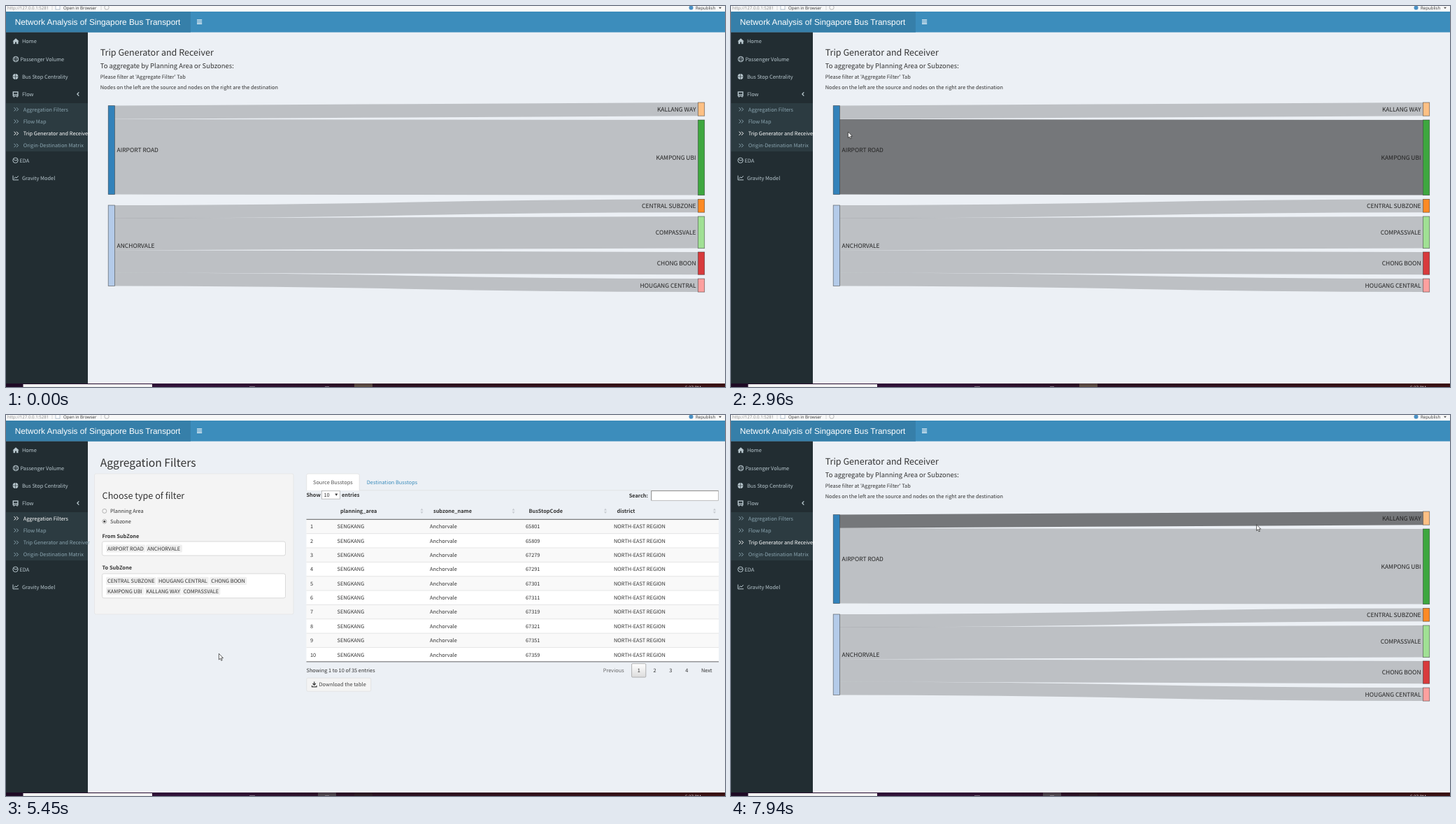
An HTML page that plays this animation: 1028x545 px, repeating every 8 s.

```html
<!DOCTYPE html>
<html lang="en">
<head>
<meta charset="utf-8">
<title>Bus transport dashboard</title>
<style>
  html, body { margin: 0; width: 100%; height: 100%; overflow: hidden; background: #ecf0f5; }
  svg { display: block; width: 100%; height: 100%; }
  text {
    font-family: "Noto Sans CJK JP", "Noto Sans CJK SC", "Noto Sans CJK KR", "Noto Sans CJK TC", "Noto Sans CJK", Lato, sans-serif;
    font-size: 7.38px; fill: #333; text-rendering: geometricPrecision; white-space: pre;
  }
  .b { font-weight: 700; }
  .end { text-anchor: end; }
  .mid { text-anchor: middle; }
  .head { font: 11.8px "Liberation Sans", Arial, sans-serif; fill: #fff; }
  .ui { font: 6.1px "Open Sans", "Noto Sans", sans-serif; }
  .node { font-size: 8.46px; fill: #222; }
  .menu text { fill: #b8c7ce; }
  .menu .sub text { fill: #8aa4af; }
  .menu .hot text { fill: #fff; }
  .icon { fill: none; stroke: #b8c7ce; stroke-width: 1; }
  .sub .icon { stroke: #8aa4af; }
  .hot .icon { stroke: #fff; }
  .link { fill: none; stroke: #000; stroke-opacity: .2; }
  .link.hot { stroke-opacity: .5; }
  .box { fill: #fff; stroke: #ccc; stroke-width: .7; }
</style>
</head>
<body>
<svg id="stage" viewBox="0 0 1028 545" preserveAspectRatio="none" xmlns="http://www.w3.org/2000/svg"></svg>
<script>
const rect = (x, y, w, h, fill, more = '') =>
  `<rect x="${x}" y="${y}" width="${w}" height="${h}" ${fill ? `fill="${fill}"` : ''} ${more}/>`;
const text = (x, y, s, cls = '', more = '') => `<text x="${x}" y="${y}" class="${cls}" ${more}>${s}</text>`;
const path = (d, more = 'class="icon"') => `<path d="${d}" ${more}/>`;
const circle = (x, y, r, more = 'class="icon"') => `<circle cx="${x}" cy="${y}" r="${r}" ${more}/>`;
const line = (x1, x2, y, color, w = .7) => path(`M${x1} ${y}H${x2}`, `stroke="${color}" stroke-width="${w}"`);
const size = px => `style="font-size:${px}px"`;
const fill = color => `style="fill:${color}"`;

function browserBar() {
  return rect(0, 0, 1028, 8, '#f8f8f8')
    + text(2, 4.8, 'http://127.0.0.1:5281', 'ui', fill('#888'))
    + text(82, 4.8, 'Open in Browser', 'ui')
    + text(986, 4.8, 'Republish', 'ui')
    + rect(71, -1, 6, 6, '#fff', 'stroke="#9ab" stroke-width=".7"')
    + circle(144, 2, 3.2, 'fill="none" stroke="#bbb" stroke-width="1"')
    + circle(979.5, 2.5, 3, 'fill="#4a90c4"')
    + path('M1019 1.8h4l-2 2.2z', 'fill="#444"')
    + path('M66 0V6M136 0V6', 'stroke="#ccc" stroke-width=".7"');
}

function header() {
  return rect(0, 8, 1028, 29.6, '#3c8dbc') + rect(0, 8, 264, 29.6, '#367fa9')
    + text(12.7, 27, 'Network Analysis of Singapore Bus Transport', 'head')
    + path('M273 20.2h7.2M273 22.8h7.2M273 25.4h7.2', 'stroke="#fff" stroke-width="1.3"');
}

function sidebar() {
  const subs = ['Aggregation Filters', 'Flow Map', 'Trip Generator and Receiver', 'Origin-Destination Matrix'];
  const solid = 'fill="#b8c7ce"';
  return rect(0, 37.6, 117, 502.4, '#222d32') + rect(0, 139, 117, 69, '#2c3b41') + '<g class="menu">'
    + path('M9.5 50.5L14 46.3l4.7 4.2h-1.2v3.7h-2.6v-2.6h-1.8v2.6h-2.6v-3.7z', solid)
    + text(23, 53, 'Home')
    + circle(14, 76, 3.8) + path('M10.5 74.5h7M10.5 77.5h7M12.5 72.7v6.6M15.5 72.7v6.6', 'class="icon" style="stroke-width:.5"')
    + text(20.5, 78.8, 'Passenger Volume')
    + circle(13.5, 101, 3.9, solid) + path('M9.6 101h7.8M13.5 97v8', 'stroke="#222d32" stroke-width=".6"')
    + text(23, 104, 'Bus Stop Centrality')
    + `<g id="flow">${rect(0, 113.4, 117, 25.6, '#1e282c', 'id="flowBg"')}${rect(0, 113.4, 1.7, 25.6, '#3c8dbc', 'id="flowEdge"')}`
    + rect(10.3, 123, 6.6, 5.6, 'none', 'class="icon" style="stroke-width:1.4"') + path('M10 126.5h7M11.3 129v1.8M16 129v1.8')
    + text(23, 129.4, 'Flow')
    + path('M104.3 123.4l-2.4 2.6 2.4 2.6', 'class="icon" style="stroke-width:1.3"') + '</g>'
    + subs.map((name, i) => {
        const y = 147.8 + i * 17.25;
        return `<g class="sub">${path(`M11.5 ${y - 2.6}l2.6 2.6-2.6 2.6M15 ${y - 2.6}l2.6 2.6-2.6 2.6`)}${text(24.7, y + 2.9, name)}</g>`;
      }).join('')
    + circle(13.5, 220.8, 3.7) + path('M11 219.5l2.5 1.5 3-1')
    + text(19.5, 223.8, 'EDA')
    + path('M10 242.5v6.3h8M11.5 247l2-2.2 1.6 1.2 2.6-3')
    + text(23, 249, 'Gravity Model') + '</g>';
}

function sankeyPage() {
  // left centre, right centre, thickness, right colour, name
  const flows = [
    [152.1, 147.6, 19.2, '#ffbb78', 'KALLANG WAY'],
    [215.8, 216.8, 107.6, '#2ca02c', 'KAMPONG UBI'],
    [294.4, 285.8, 18.8, '#ff7f0e', 'CENTRAL SUBZONE'],
    [326.4, 323.8, 45.6, '#98df8a', 'COMPASSVALE'],
    [365.3, 368.1, 32.3, '#d62728', 'CHONG BOON'],
    [391, 399.6, 19, '#ff9896', 'HOUGANG CENTRAL']
  ];
  const node = (x, top, h, color) =>
    rect(x, top, 9.2, h, color, 'opacity=".9" stroke="rgba(0,0,0,.55)" stroke-width=".8"');
  const links = flows.map(([a, b, w]) =>
    path(`M155.4 ${a}C572.5 ${a} 572.5 ${b} 989.5 ${b}`, `class="link" stroke-width="${w}"`));
  const ends = flows.map(([, y, h, color, name]) =>
    node(989.5, y - h / 2, h, color) + text(986.5, y + 3.1, name, 'node end'));
  return text(134.7, 71.3, 'Trip Generator and Receiver', '', size(12.55))
    + text(134.7, 89, 'To aggregate by Planning Area or Subzones:', '', size(9.45))
    + text(134.7, 104.2, 'Please filter at \'Aggregate Filter\' Tab')
    + text(134.7, 118.7, 'Nodes on the left are the source and nodes on the right are the destination')
    + links.join('') + ends.join('')
    + node(146.2, 142.6, 126.9, '#1f77b4') + text(158.6, 209.2, 'AIRPORT ROAD', 'node')
    + node(146.2, 285, 115.4, '#aec7e8') + text(158.6, 346, 'ANCHORVALE', 'node');
}

function filterPanel() {
  const tag = (x, y, w, name) => rect(x - 2, y - 5.6, w + 4, 11.2, '#efefef', 'rx="1.5"') + text(x, y + 2.8, name);
  const radio = y => circle(140.8, y, 3, 'fill="#f4f4f4" stroke="#999" stroke-width=".7"');
  return rect(126.5, 84, 284.5, 201, '#f4f4f4', 'rx="2" stroke="#e3e3e3" stroke-width=".7"')
    + text(137.6, 119.6, 'Choose type of filter', '', size(12.6))
    + radio(137.4) + text(149, 140.2, 'Planning Area')
    + radio(152.2) + circle(140.8, 152.2, 1.5, 'fill="#444"') + text(149, 155, 'Subzone')
    + text(137.6, 175.7, 'From SubZone', 'b')
    + rect(137.5, 181, 262, 20, '', 'class="box" rx="2.4"')
    + tag(145, 191, 52.2, 'AIRPORT ROAD') + tag(202, 191, 48, 'ANCHORVALE')
    + text(137.6, 221, 'To SubZone', 'b')
    + rect(137.5, 227, 262, 34.8, '', 'class="box" rx="2.4"')
    + tag(145, 237.3, 67.7, 'CENTRAL SUBZONE') + tag(218, 237.3, 69.8, 'HOUGANG CENTRAL') + tag(293.2, 237.3, 49, 'CHONG BOON')
    + tag(145, 251.9, 50, 'KAMPONG UBI') + tag(200.3, 251.9, 48.5, 'KALLANG WAY') + tag(253.8, 251.9, 50.5, 'COMPASSVALE');
}

function stopTable() {
  const codes = [65801, 65809, 67279, 67291, 67301, 67311, 67319, 67321, 67351, 67359];
  const step = 20.36, top = 149.3;
  const heads = [[478, 'planning_area', 594.5], [611, 'subzone_name', 725.5], [747.5, 'BusStopCode', 857], [873.5, 'district', 1013]];
  const rows = codes.map((code, i) => {
    const y = top + i * step, base = y + 13;
    return rect(429.5, y, 589.5, step, i % 2 ? '#fff' : '#f9f9f9') + (i ? line(429.5, 1019, y, '#ddd') : '')
      + text(435, base, i + 1) + text(473.5, base, 'SENGKANG') + text(606, base, 'Anchorvale')
      + text(743, base, code) + text(869, base, 'NORTH-EAST REGION');
  });
  return heads.map(([x, name, arrow]) => text(x, 140.2, name, 'b')
      + path(`M${arrow - 2} 136.4l2-2.8 2 2.8zM${arrow - 2} 138.2l2 2.8 2-2.8z`, 'fill="#c8ccd2"')).join('')
    + rows.join('') + line(429.5, 1019, top, '#222') + line(429.5, 1019, top + 10 * step, '#222');
}

function filtersPage() {
  return text(134.7, 74.2, 'Aggregation Filters', '', size(15.7)) + filterPanel()
    + line(429.5, 1019, 107.8, '#ddd')
    + path('M429.8 108V86.3q0-2.2 2.2-2.2h71q2.2 0 2.2 2.2V108', 'fill="#fff" stroke="#ddd" stroke-width=".7"')
    + text(439, 99, 'Source Busstops', '', fill('#555'))
    + text(515.8, 99, 'Destination Busstops', '', fill('#3c8dbc'))
    + text(429.5, 117, 'Show', 'b') + rect(451.5, 108.5, 26, 11.6, '#fff', 'stroke="#a9a9a9" stroke-width=".7"')
    + text(454.5, 117, '10') + path('M470.3 112.6h4l-2 3.2z', 'fill="#333"') + text(480, 117, 'entries', 'b')
    + text(918, 117.6, 'Search:', 'b end') + rect(922.7, 108.5, 95.8, 13.8, '#fff', 'stroke="#b0b0b0" stroke-width=".8"')
    + path('M922.7 122V108.5h95.8', 'fill="none" stroke="#888" stroke-width=".8"')
    + stopTable()
    + text(429.5, 367.8, 'Showing 1 to 10 of 35 entries')
    + text(853.8, 367.8, 'Previous', '', fill('#666'))
    + rect(894.6, 355.7, 20.2, 19.4, 'url(#press)', 'rx="1.2" stroke="#979797" stroke-width=".7"')
    + [904.7, 927.5, 950.4, 973.2].map((x, i) => text(x, 367.8, i + 1, 'mid')).join('')
    + text(994, 367.8, 'Next')
    + rect(429.8, 376.2, 92, 19, '#f4f4f4', 'rx="1.8" stroke="#ddd" stroke-width=".7"')
    + path('M440.7 381.5v4.2M438.5 384l2.2 2.4 2.2-2.4M437.5 387v1.8h6.5V387', 'fill="none" stroke="#444" stroke-width="1.3"')
    + text(447.5, 388.4, 'Download the table', '', fill('#444'));
}

function taskbar() {
  return rect(0, 540, 1028, 5, 'url(#bar)') + rect(24.5, 541, 184.5, 4, '#f2f2f2')
    + rect(446, 540.4, 26, 4.6, '#4c434b', 'id="taskA"') + rect(498, 540.4, 26, 4.6, '#5a4a42', 'id="taskB"')
    + path('M348 544.6h8M456 544.6h6', 'stroke="#998d98" stroke-width=".8"')
    + text(971, 548, '5:27 PM', 'ui', fill('#fff'));
}

const gradient = (id, dir, stops) => `<linearGradient id="${id}" x2="${dir ? 0 : 1}" y2="${dir}">`
  + stops.map(([at, color]) => `<stop offset="${at}" stop-color="${color}"/>`).join('') + '</linearGradient>';

document.getElementById('stage').innerHTML =
  '<defs>' + gradient('press', 1, [[0, '#fff'], [1, '#dcdcdc']])
  + gradient('bar', 0, [[0, '#1d0a24'], [.25, '#32123a'], [.5, '#2a1022'], [1, '#3a1012']]) + '</defs>'
  + rect(0, 0, 1028, 545, '#ecf0f5') + browserBar() + header()
  + `<g id="sankey">${sankeyPage()}</g><g id="filters">${filtersPage()}</g>`
  + sidebar() + taskbar()
  + path('M.4.3V9l2-1.8 1.4 3.1 1.4-.6-1.4-3.1h2.7z', 'id="arrow" fill="#fff" stroke="#222" stroke-width=".7"')
  + path('M2 1q.8-.9 1.6 0v3.2l2.4.6q.8.2.8 1V8L6 11H2.7L.3 7.6q.2-1.1 1.1-.5l.6.6z', 'id="hand" fill="#fff" stroke="#222" stroke-width=".6"');

// time, cursor, x, y, page, lit submenu rows, lit link, Flow row lit
const steps = [
  [0, '', 0, 0, 'sankey', [2]],
  [960, 'arrow', 275, 433, 'sankey', [2]],
  [1460, 'arrow', 61, 265, 'sankey', [2]],
  [1970, 'arrow', 933, 271, 'sankey', [2]],
  [2460, 'arrow', 423, 274.7, 'sankey', [2]],
  [2960, 'arrow', 167, 179.7, 'sankey', [2], 1],
  [3460, 'arrow', 143, 124.5, 'sankey', [2]],
  [3970, 'hand', 76.6, 147.3, 'filters', [0], -1, true],
  [4460, 'arrow', 229, 160, 'filters', [0]],
  [4970, 'arrow', 354, 218, 'filters', [0]],
  [5450, 'arrow', 304, 341, 'filters', [0]],
  [5940, 'hand', 50, 183, 'filters', [0, 2], -1, true],
  [6460, 'hand', 52, 202.5, 'filters', [0, 3], -1, true],
  [6960, 'hand', 46.6, 181.7, 'filters', [0, 2], -1, true],
  [7470, 'arrow', 230, 182, 'sankey', [2]],
  [7940, 'arrow', 751, 156.5, 'sankey', [2], 0]
];
const LOOP = 8000;
const byId = id => document.getElementById(id);
const show = (id, on) => byId(id).style.display = on ? '' : 'none';
const subRows = document.querySelectorAll('.sub');
const links = document.querySelectorAll('.link');
let current;

function apply([time, cursor, x, y, page, lit, link = -1, flowLit = false]) {
  for (const id of ['sankey', 'filters']) show(id, id === page);
  for (const id of ['arrow', 'hand']) {
    show(id, id === cursor);
    byId(id).setAttribute('transform', `translate(${x} ${y})`);
  }
  subRows.forEach((row, i) => row.classList.toggle('hot', lit.includes(i)));
  links.forEach((el, i) => el.classList.toggle('hot', i === link));
  byId('flow').classList.toggle('hot', flowLit);
  show('flowBg', flowLit);
  show('flowEdge', flowLit);
  show('taskA', time >= 3970);
  byId('taskB').setAttribute('fill', time >= 3970 ? '#2c1a22' : '#5a4a42');
}

function tick() {
  const now = performance.now() % LOOP;
  const step = steps.findLast(s => s[0] <= now);
  if (step !== current) apply(current = step);
  requestAnimationFrame(tick);
}
tick();
</script>
</body>
</html>
```
